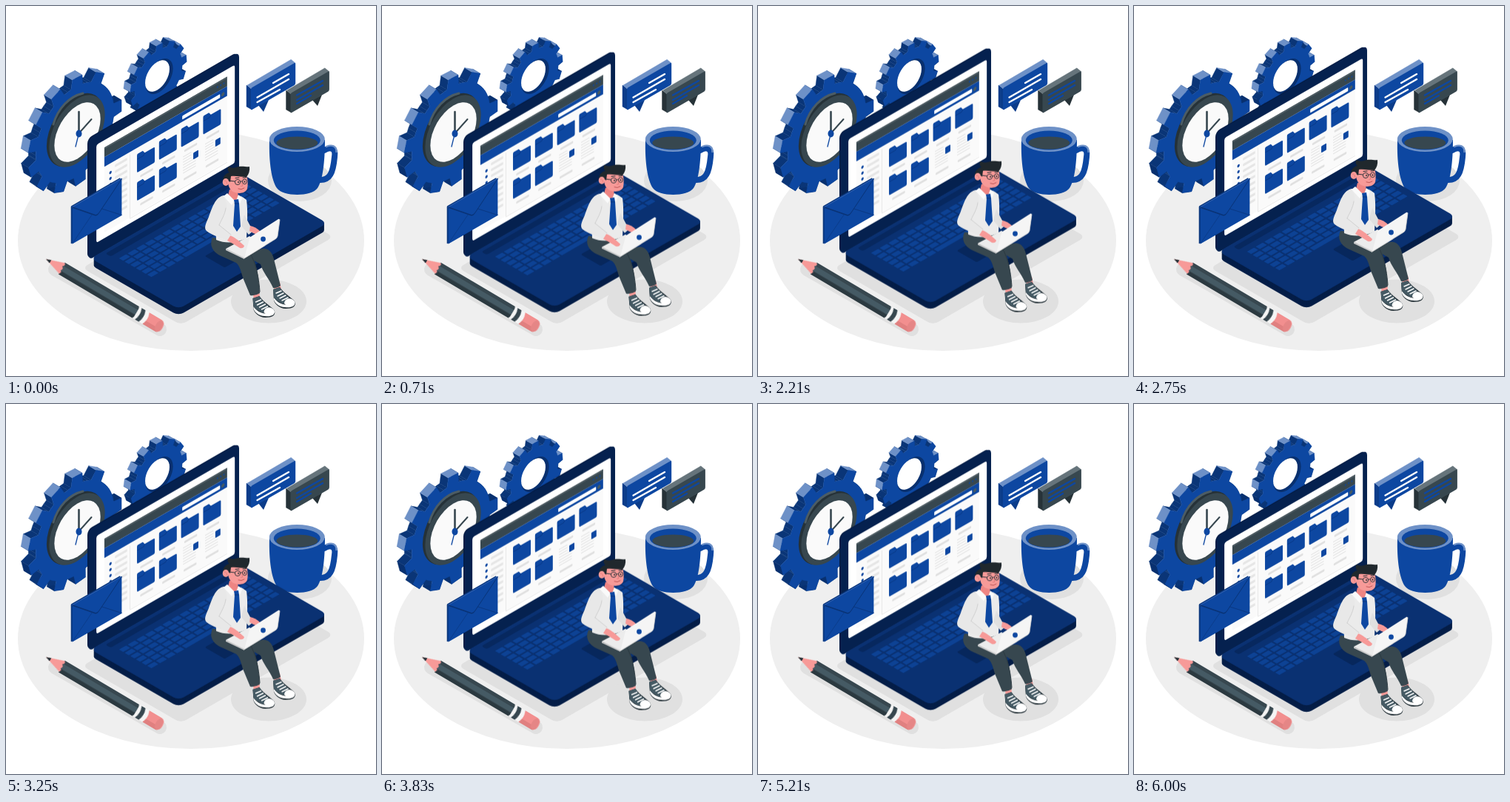
These frames come from a looping animation (500 px wide and 500 px high, 6040 ms). An HTML page:

```html
<!DOCTYPE html>
<html lang="en">
<head>
<meta charset="utf-8">
<title>Isometric workspace</title>
<style>
  html, body { margin: 0; width: 100%; height: 100%; overflow: hidden; background: #fff; }
  svg { display: block; width: 100%; height: 100%; }
</style>
</head>
<body>
<svg id="stage" viewBox="0 0 500 500" xmlns="http://www.w3.org/2000/svg"></svg>
<script>
const BLUE = '#0d47a1', LIGHT = '#6e91c7', NAVY = '#0a3172', DEEP = '#05214f';
const SLATE = '#37474f', INK = '#263238', SKIN = '#f79a98', SHADE = '#e0e0e0';

const rect = (x, y, w, h, fill, r = 0) =>
  `<rect x="${x}" y="${y}" width="${w}" height="${h}" rx="${r}" fill="${fill}"/>`;
const oval = (x, y, rx, ry, fill) =>
  `<ellipse cx="${x}" cy="${y}" rx="${rx}" ry="${ry}" fill="${fill}"/>`;
const path = (d, fill) => `<path d="${d}" fill="${fill}"/>`;
const line = (d, color, w = 1) =>
  `<path d="${d}" fill="none" stroke="${color}" stroke-width="${w}" stroke-linecap="round" stroke-linejoin="round"/>`;
const poly = (pts, fill) =>
  `<polygon points="${pts.map(p => p.map(n => n.toFixed(2))).join(' ')}" fill="${fill}" stroke="${fill}" stroke-width=".4"/>`;
const group = (t, ...parts) => `<g transform="${t}">${parts.join('')}</g>`;
const range = n => [...Array(n).keys()];

// The two isometric planes: upright (right and down) and floor.
const wall = (x, y, ...parts) => group(`matrix(.866 -.5 0 1 ${x} ${y})`, ...parts);
const ground = (x, y, ...parts) => group(`matrix(.866 -.5 .866 .5 ${x} ${y})`, ...parts);
const disc = (x, y, r, fill) => wall(x, y, `<circle r="${r}" fill="${fill}"/>`);

function gear(cx, cy, outer, inner, dx, dy, teeth) {
  const at = (deg, r, tip) => {
    const a = deg * Math.PI / 180, u = r * Math.cos(a), v = r * Math.sin(a);
    return { p: [cx + .866 * u, cy - .5 * u - v], tip, v };
  };
  const pts = [];
  teeth.forEach((a, i) => {
    const next = i + 1 < teeth.length ? teeth[i + 1] : teeth[0] + 360;
    pts.push(at(a - 8.5, inner), at(a - 6, outer, true), at(a + 6, outer));
    for (let b = a + 8.5; b < next - 9; b += 5) pts.push(at(b, inner));
  });
  const back = ([x, y]) => [x + dx, y + dy];
  const sides = pts.map((s, i) => {
    const e = pts[(i + 1) % pts.length];
    const fill = s.tip ? (s.v > -.1 * outer ? LIGHT : '#08306f') : '#0a3577';
    return { tip: !!s.tip, svg: poly([s.p, e.p, back(e.p), back(s.p)], fill) };
  }).sort((a, b) => a.tip - b.tip);
  return sides.map(s => s.svg).join('') + poly(pts.map(s => s.p), BLUE);
}

const floor = () => [
  oval(250, 317, 234, 149, '#efefef'),
  ground(103, 354, rect(0, 0, 238, 154, SHADE, 8)),
  oval(397, 236, 43, 28, SHADE),
  oval(355, 399, 51, 29.5, SHADE),
  line('M66 356L208 437', SHADE, 18)
].join('');

const clock = () => [
  gear(93, 171, 73, 61, -10, -6, [0, 57, 87, 114, 140, 167, 195, 222, 250, 277, 305, 332]),
  disc(93, 167, 44, INK), disc(94, 168, 44, INK),
  disc(96, 169, 43.5, SLATE),
  line('M64 160C70 138 86 122 104 118', '#4c5c64', 3),
  disc(96.5, 170.5, 36, '#fafafa'),
  line('M98.5 172V143', SLATE, 2.6), line('M98.5 172L115.5 153', SLATE, 2),
  line('M98.5 172L94 190', BLUE, 1.3), oval(98.5, 172.5, 4, 5, BLUE)
].join('');

const smallGear = () => [
  gear(206, 96.5, 44, 37, -9, -5, range(13).map(i => 5 + i * 360 / 13)),
  disc(207, 95, 21.5, '#08306f'), disc(204.5, 94.5, 19, '#fff')
].join('');

const bubble = (x, y, w, h, tail, front, top, side, ink, lines) => [
  poly([[x - 6, y - 4], [x + 1, y + 1], [x + 1, y + h - 1], [x - 6, y + h - 5]], side),
  poly([[x - 5, y - 4], [x - 6 + .866 * w, y - 4 - .5 * w],
    [x + .866 * w, y - .5 * w + 1], [x, y + 1]], top),
  path(tail, side), wall(x, y, rect(0, 0, w, h, front, 2)),
  lines.map(d => line(d, ink, 2.4)).join('')
].join('');

const bubbles = () => [
  bubble(331, 111, 69.5, 30, 'M341 134L348 143L355 127z', BLUE, LIGHT, '#0b3c8a', '#fff',
    ['M361 104L382 92', 'M339.5 123.5L382 99', 'M339.5 130L370 113']),
  bubble(384.5, 118, 60.5, 27, 'M414 127L421 135L427 120z', SLATE, '#66747b', INK, BLUE,
    ['M393 120.5L428 101', 'M393 127L428 107', 'M393 132L412 121'])
].join('');

const cup = () => [
  line('M430 195C439 190 446 192 444 204C442 225 438 236 423 235', BLUE, 8),
  line('M433 190C440 187 447 189 446.5 197', LIGHT, 2.4),
  path('M356 181C355 211 359 236 366 246C374 258 413 258 421 246C428 236 431 211 431 181z', BLUE),
  oval(393.3, 180, 37.5, 17, LIGHT), oval(393.3, 181.5, 31.5, 13, BLUE),
  oval(393.3, 185, 28, 8.6, SLATE)
].join('');

const folder = (u, v) => group(`translate(${u} ${v})`,
  path('M0 2Q0 0 1.5 0H9L12 4H26Q27.7 4 27.7 5.5V23Q27.7 25 26 25H1.5Q0 25 0 23z', BLUE),
  line('M1 7H10L12 5', '#093580', .7), rect(5, 31, 20, 3, SHADE, 1));

const sheet = (u, v) => group(`translate(${u} ${v})`,
  range(7).map(i => rect(3, 1 + i * 3.7, i < 3 ? 13 : 20, 1, SHADE)).join(''),
  rect(19, 4, 8, 9, BLUE, 1), rect(4, 31, 20, 3, SHADE, 1));

const lid = () => [
  wall(110, 179, rect(0, 0, 234, 163, '#041c45', 7)),
  wall(111.5, 179.5, rect(0, 0, 235, 164, DEEP, 7)),
  wall(110, 183,
    rect(14, 11.5, 216, 132.5, '#fff', 3),
    rect(26.5, 22, 191.5, 114, '#fafafa'),
    rect(26.5, 21.5, 191.5, 13, SLATE), rect(26.5, 21.5, 191.5, 2, '#515f66'),
    rect(26.5, 34.5, 191.5, 13, BLUE),
    rect(148, 39.5, 59, 5, '#fff', 1),
    '<circle cx="211.5" cy="42" r="2.6" fill="#455a64"/>',
    range(3).map(i => `<circle cx="${203 + i * 5}" cy="28" r="1.1" fill="${BLUE}"/>`).join(''),
    rect(66, 51, .8, 86, SHADE), rect(66, 137, 152, .8, SHADE),
    range(9).map(i => rect(43, 53 + i * 8, 19, 3.4, '#e6e6e6', 1)).join(''),
    range(5).map(i => `<circle cx="36" cy="${60 + i * 8}" r="1.9" fill="${BLUE}"/>`).join(''),
    range(4).map(i => folder(77.4 + i * 34.4, 56)).join(''),
    folder(77.4, 94), folder(111.8, 94), sheet(146.2, 94), sheet(180.6, 94))
].join('');

function keys() {
  const key = (p, q, w) => rect(p, q, w, 6.6, '#0d4294', 1);
  return range(6).map(r => range(15).map(c => {
    const q = 22 + r * 8.8;
    if (r === 5 && c > 3 && c < 9) return c === 4 ? key(76, q, 65) : '';
    return key(22 + c * 13.5, q, 11.2);
  }).join('')).join('');
}

const base = () => [
  [9, 7, 5, 3, 1].map(d => ground(114.5, 341 + d, rect(0, 0, 232, 137, '#041d47', 8))).join(''),
  ground(114.5, 341, rect(0, 0, 232, 137, NAVY, 8),
    rect(18, 5, 200, 8, '#07285f', 3), keys(), rect(92, 86, 44, 31, '#07275c', 2))
].join('');

const shoe = (x, y) => group(`translate(${x} ${y})`,
  path('M0 3L9 0C14 8 24 13 29 19C32 26 26 29 17 29C8 29 2 22 1 18z', INK),
  path('M1 14C6 22 17 27 29 21C30 26 24 28 16 27C8 27 2 21 1 17z', '#fff'),
  path('M0 3L9 0C12 6 18 11 22 14L14 23C7 20 2 16 1 14z', '#455a64'),
  path('M15 22C15 17 21 14 25 16C29 18 31 21 28 24C24 26 18 26 15 22z', '#fff'),
  line('M4 8L11 5M6 12L14 8M9 15L17 11M12 18L20 14', '#fff', 1.4));

const legs = () => [
  path('M333 384L342 383L343 394L335 397z', SKIN),
  path('M362 374L370 373L372 383L363 386z', SKIN),
  shoe(361, 380), shoe(333.5, 392),
  path('M318 334L346 328C356 326 361 335 363 346L371 378Q366 382 361 381C356 369 347 360 344 349z', SLATE),
  path('M279 313C274 324 280 333 291 338L311 347C316 351 318 360 320 367L330 391Q337 392 343 388C342 370 339 350 333 338L324 316z', SLATE),
  line('M324 326C334 338 341 356 343 386', '#2c3a41')
].join('');

const torso = () => [
  path('M294 256C284 258 280 270 283 286L284 316Q303 324 325 314C326 296 327 276 325 262Q318 256 313 256z', '#ebebeb'),
  path('M322 282L330 297L336 302L328 309L318 297z', SHADE),
  path('M330 297Q337 298 344 305L340 309Q333 307 329 304z', SKIN),
  path('M302 248L313 249L314 260Q308 267 300 256z', '#ee8583'),
  path('M299 253L309 263L305 269L294 257z', '#fafafa'),
  path('M314 255L311 263L316 267L319 260z', '#fafafa'),
  path('M308 262L314 261L315 267L317 298L312 305L307 297L309 267z', BLUE),
  line('M309 267L314 267', '#08306f', .8)
].join('');

const notebook = () => [
  path('M297 328L329 311L350 324L322 341z', '#ececec'),
  path('M297 328L322 340V342L297 330z', '#cfcfcf'),
  path('M297 310C304 309 308 313 313 316L322 324Q321 328 316 327L308 322L299 317z', SKIN),
  path('M294 257C283 257 278 274 274 285C270 294 267 300 271 304C278 310 289 312 299 317L304 309L288 296C293 288 299 276 298 266z', '#e8e8e8'),
  line('M288 296L304 309M288 296C291 289 296 282 297 273', '#cfcfcf', .9),
  path('M329 314Q330 312 332 311L368 288Q370 287 370 290L367 311Q366 314 364 315L322 341z', '#f5f5f5'),
  line('M322 341L364 315Q366 314 367 311L370 289', '#cfcfcf', .8),
  oval(347.5, 315, 3.4, 3.4, BLUE)
].join('');

const lens = (x, y, rx, ry) =>
  `<ellipse cx="${x}" cy="${y}" rx="${rx}" ry="${ry}" fill="none" stroke="${INK}" stroke-width=".9"/>`;

const head = () => [
  path('M300 229L325 228C327 235 327 242 326 247C323 254 313 254 307 251C301 248 299 240 300 229z', SKIN),
  path('M295 244C291 236 293 227 302 225C299 223 299 219 301 217C304 219 307 219 311 218C318 215 325 218 329 217Q330 225 325 231C318 231 310 229 304 230L303 238L299 235z', '#20282d'),
  oval(297, 238, 4.3, 5, SKIN), line('M295.5 236Q298 236 298.5 240', '#df7674', .8),
  line('M301 236L309 237M317 237L319 237', INK, 1),
  lens(313, 238, 3.6, 3.6), lens(322.5, 237.3, 2.9, 3.4),
  oval(314, 238, .8, 1.2, INK), oval(322.5, 237.5, .8, 1.2, INK),
  line('M310 232.5L315 232M320 232L325 231.5', INK, 1.1),
  line('M318.5 238L320 243L317.5 243.5', '#df7674', .8),
  line('M314 247Q318 249 322 246', '#b84f50', .9)
].join('');

const pencil = () => group('translate(54 342) rotate(30.6)',
  path('M0 0L26 -9L29 9z', SKIN), path('M0 0L7 -2.5V2.2z', INK),
  path('M24 -9H142V9H25Q29 6 25 3Q28 0 24 -3Q28 -6 24 -9z', SLATE),
  path('M25 -4H142V3H25Q27 0 25 -4z', '#455a64'), path('M27 4H142V9H25z', '#2b3940'),
  path('M141 -9H158Q162 0 158 9H141Q145 0 141 -9z', '#f5f5f5'),
  path('M145 -9H151Q155 0 151 9H145Q149 0 145 -9z', SLATE),
  path('M157 -9H177Q183 -8 183 0Q183 8 177 9H157Q161 0 157 -9z', '#f28f8f'),
  path('M159 3H182Q181 8 177 9H157z', '#e08080'),
  oval(177.5, 0, 4.5, 8, '#e58686'));

const envelope = () => [
  wall(87.7, 270.5, rect(0, 0, 77, 51, '#0a377e', 1)),
  wall(89.7, 271, rect(0, 0, 77, 50.5, BLUE, 1),
    line('M0 50L31 26M77 50L46 26', '#0a3a86', .9),
    line('M0 1L35 29Q38.5 32 42 29L77 1', '#093376', 1.2),
    line('M0 .5H76', '#3b68b3', .8))
].join('');

document.getElementById('stage').innerHTML = [
  floor(), smallGear(), clock(), bubbles(), cup(),
  `<g id="float">${lid()}${base()}${legs()}${torso()}${head()}${notebook()}</g>`,
  pencil(), envelope()
].join('');

document.getElementById('float').animate(
  [0, -10, 0].map(y => ({ transform: `translateY(${y}px)` })),
  { duration: 6040, iterations: Infinity, easing: 'linear' });
</script>
</body>
</html>
```
